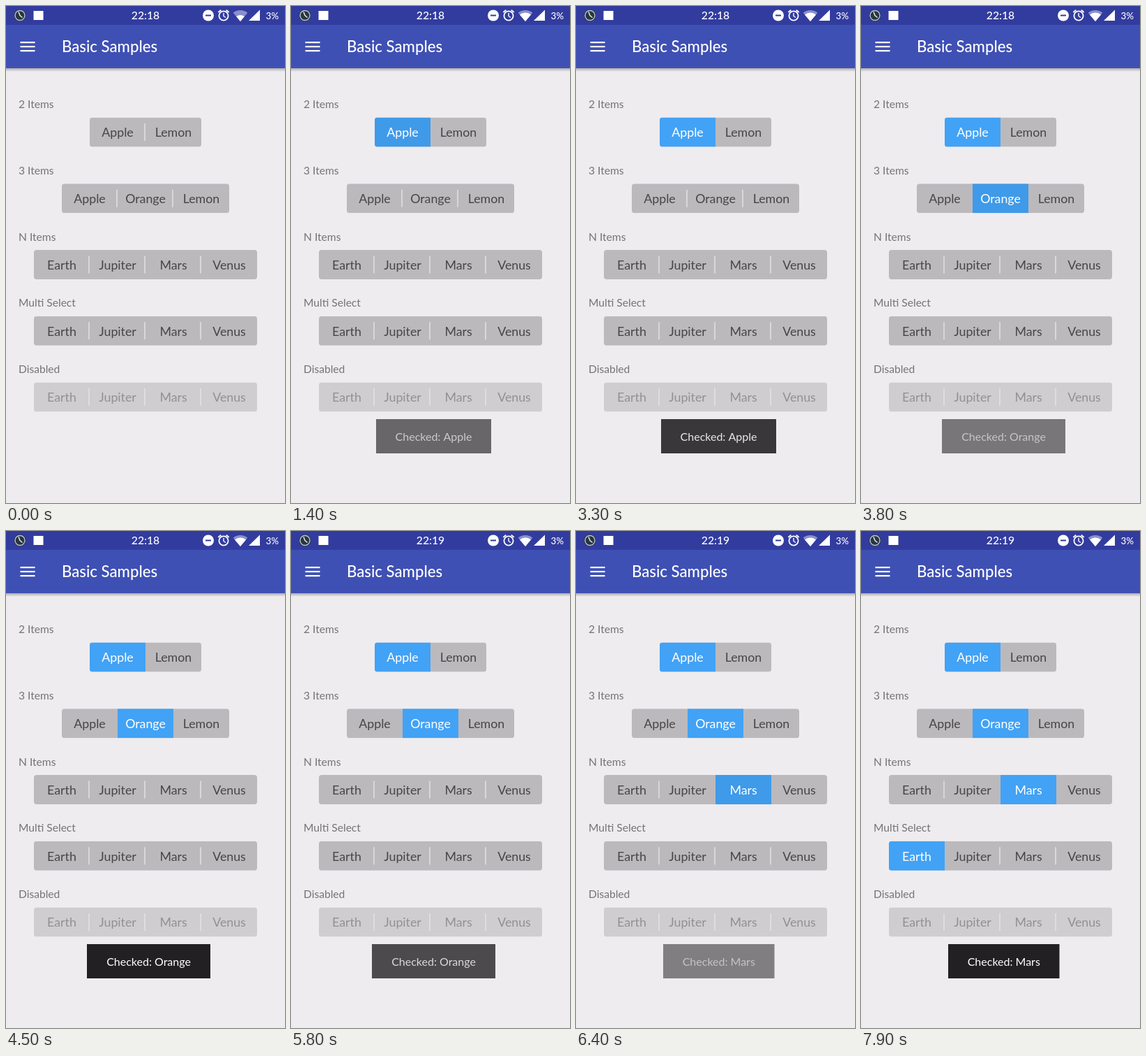
Recreate the animation shown at these times as an HTML page with a canvas. Size 400x711 px, loop 8 s.

```html
<!DOCTYPE html>
<html lang="en">
<head>
<meta charset="utf-8">
<title>Toggle switch samples</title>
<style>
  html, body { margin: 0; width: 100%; height: 100%; overflow: hidden; background: #eeecef; }
  canvas { display: block; width: 400px; height: 711px; }
</style>
</head>
<body>
<canvas id="stage"></canvas>
<script>
const LOOP = 8000, STEP = 100;
const FADE = 500, RIPPLE = 900;
const BLUE = '#42a2f5', STATUS = '#323c9f';
const PLANETS = ['Earth', 'Jupiter', 'Mars', 'Venus'];

const groups = [
  { label: '2 Items', items: ['Apple', 'Lemon'], checked: 0, at: 1100 },
  { label: '3 Items', items: ['Apple', 'Orange', 'Lemon'], checked: 1, at: 3500 },
  { label: 'N Items', items: PLANETS, checked: 2, at: 6200 },
  { label: 'Multi Select', items: PLANETS, checked: 0, at: 7900 },
  { label: 'Disabled', items: PLANETS, disabled: true, at: Infinity }
];

const toasts = [
  { text: 'Checked: Apple', x: 122, w: 165, start: 1195, end: 3130 },
  { text: 'Checked: Orange', x: 116, w: 177, start: 3625, end: 5571 },
  { text: 'Checked: Mars', x: 125, w: 159.5, start: 6240, end: 8190 }
];

const canvas = document.getElementById('stage');
const ctx = canvas.getContext('2d');
const ratio = window.devicePixelRatio || 1;
canvas.width = 400 * ratio;
canvas.height = 711 * ratio;
ctx.scale(ratio, ratio);

const clamp = v => Math.max(0, Math.min(1, v));

function rect(x, y, w, h, color) {
  ctx.fillStyle = color;
  ctx.fillRect(x, y, w, h);
}

function text(str, x, y, size, color, align = 'left', weight = 400) {
  ctx.font = `${weight} ${size}px Lato, sans-serif`;
  ctx.textAlign = align;
  ctx.fillStyle = color;
  ctx.fillText(str, x, y);
}

function disc(x, y, r, color) {
  ctx.beginPath();
  ctx.arc(x, y, r, 0, Math.PI * 2);
  ctx.fillStyle = color;
  ctx.fill();
}

function ring(x, y, r, width, color) {
  ctx.beginPath();
  ctx.arc(x, y, r, 0, Math.PI * 2);
  ctx.strokeStyle = color;
  ctx.lineWidth = width;
  ctx.stroke();
}

function line(points, width, color) {
  ctx.beginPath();
  points.forEach(p => ctx.lineTo(...p));
  ctx.strokeStyle = color;
  ctx.lineWidth = width;
  ctx.stroke();
}

function wifi(r, color) {
  ctx.beginPath();
  ctx.moveTo(336, 22);
  ctx.arc(336, 22, r, -Math.PI / 2 - 0.7, -Math.PI / 2 + 0.7);
  ctx.fillStyle = color;
  ctx.fill();
}

function statusBar(t) {
  rect(0, 0, 400, 27, STATUS);

  disc(20, 13.5, 8.5, '#29363f');
  ring(20, 13.5, 7, 1.4, '#b9c6d2');
  line([[18, 8.5], [20, 13.5], [23.5, 16.5]], 1.5, '#dfe7ee');
  rect(39.5, 7, 14, 13, '#fff');

  text(t < 5600 ? '22:18' : '22:19', 200, 19, 15.7, '#fff', 'center', 500);

  disc(290, 13.5, 8, '#fff');
  rect(286, 12.5, 8, 2, STATUS);

  ring(312, 14, 6.6, 1.8, '#fff');
  line([[312, 10], [312, 14.5], [315, 16.5]], 1.4, '#fff');
  line([[304.3, 9], [308.3, 5.7]], 1.8, '#fff');
  line([[315.7, 5.7], [319.7, 9]], 1.8, '#fff');

  wifi(16, '#8990cb');
  wifi(t < 1100 ? 9 : 12.5, '#fff');

  ctx.beginPath();
  ctx.moveTo(348, 21);
  ctx.lineTo(364, 21);
  ctx.lineTo(364, 5.5);
  ctx.fillStyle = '#fff';
  ctx.fill();

  text('3%', 391, 18.5, 13.4, '#fff', 'right', 500);
}

function toolbar() {
  const shadow = ctx.createLinearGradient(0, 89, 0, 94);
  shadow.addColorStop(0, 'rgba(0,0,0,.28)');
  shadow.addColorStop(1, 'rgba(0,0,0,0)');
  rect(0, 89, 400, 5, shadow);
  rect(0, 27, 400, 62, '#3f50b4');
  [51, 57, 63].forEach(y => rect(20.5, y, 21, 2.2, '#fff'));
  text('Basic Samples', 80, 66.3, 22.2, '#fff', 'left', 500);
}

function drawGroup(group, row, t) {
  const { items, disabled } = group;
  const top = 159.5 + row * 94.75;
  const width = items.length * 80;
  const left = 200 - width / 2;
  const checked = t >= group.at ? group.checked : -9;

  text(group.label, 18, top - 13.3, 15.6, '#757376');

  ctx.save();
  ctx.beginPath();
  ctx.roundRect(left, top, width, 42, 4);
  ctx.clip();
  rect(left, top, width, 42, disabled ? '#cfcdd0' : '#bbb9bc');
  if (checked >= 0) {
    const age = t - group.at;
    const shade = 0.05 * clamp(age / 150) * clamp((RIPPLE - age) / 550);
    rect(left + checked * 80, top, 80, 42, BLUE);
    rect(left + checked * 80, top, 80, 42, `rgba(0,0,0,${shade})`);
  }
  ctx.restore();

  items.forEach((name, i) => {
    const x = left + i * 80;
    const color = i === checked ? '#fff' : disabled ? '#929093' : '#474548';
    text(name, x + 40, top + 27.8, 17.8, color, 'center');
    if (i && i !== checked && i - 1 !== checked) {
      rect(x - 2, top + 8.5, 2, 25, disabled ? '#dfdde0' : '#d9d7da');
    }
  });
}

// Decelerating entry, accelerating exit.
function toastAlpha(toast, t) {
  const enter = clamp((t - toast.start) / FADE);
  const exit = clamp((t - toast.end) / FADE);
  return (1 - (1 - enter) ** 2) * (1 - exit ** 2);
}

function drawToast(toast, t) {
  ctx.globalAlpha = toastAlpha(toast, t);
  rect(toast.x, 591, toast.w, 49, '#232024');
  text(toast.text, toast.x + toast.w / 2, 622, 16, '#fff', 'center');
  ctx.globalAlpha = 1;
}

function draw(t) {
  rect(0, 0, 400, 711, '#eeecef');
  toolbar();
  statusBar(t);
  groups.forEach((group, row) => drawGroup(group, row, t));
  toasts.forEach(toast => drawToast(toast, t));
}

const begin = performance.now();
function frame() {
  const t = (performance.now() - begin) % LOOP;
  draw(Math.floor(t / STEP) * STEP);
  requestAnimationFrame(frame);
}
frame();
</script>
</body>
</html>
```
